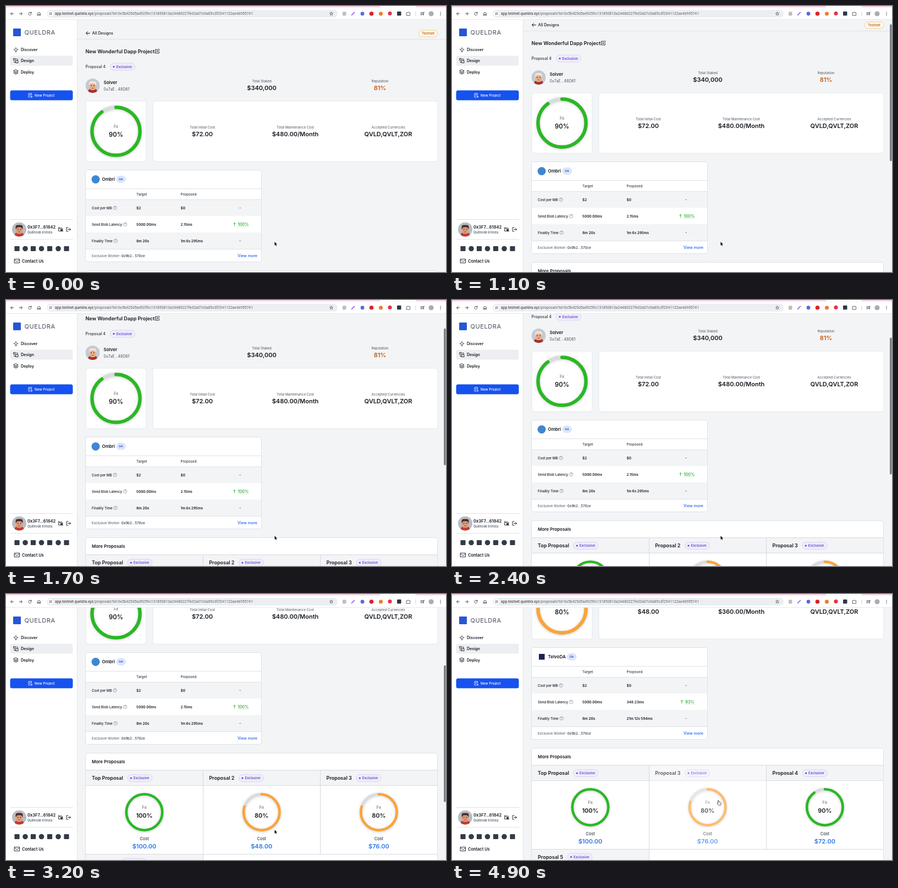
Recreate the animation shown at these times as an HTML page with a canvas. Size 800 by 484 pixels, loop 5 s.

```html
<!DOCTYPE html>
<html lang="en">
<head>
<meta charset="utf-8">
<title>Proposal page</title>
<style>
html, body { margin: 0; width: 100%; height: 100%; overflow: hidden; background: #fff; }
canvas { display: block; width: 800px; height: 484px; }
</style>
</head>
<body>
<canvas id="stage"></canvas>
<script>
const W = 800, H = 484, LOOP = 5000, STEP = 100;
const SWITCH = 4500, HOVER = 3500;
const INK = '#16191f', GRAY = '#4b5563', LINE = '#dde1e7', PAGE = '#f3f4f6';
const BLUE = '#1652f0', GREEN = '#2ab824', ORANGE = '#faa43a';

const canvas = document.getElementById('stage');
const dpr = window.devicePixelRatio || 1;
canvas.width = W * dpr;
canvas.height = H * dpr;
const c = canvas.getContext('2d');

// Drawing helpers
function text(s, x, y, size, weight = 500, color = INK, align = 'left', family = 'Inter') {
  c.font = `${weight} ${size}px ${family}, sans-serif`;
  c.fillStyle = color;
  c.textAlign = align;
  c.fillText(s, x, y + size * 0.36);
  return c.measureText(s).width;
}

function rect(x, y, w, h, color) {
  c.fillStyle = color;
  c.fillRect(x, y, w, h);
}

function box(x, y, w, h, r, fill, stroke) {
  c.beginPath();
  c.roundRect(x, y, w, h, r);
  if (fill) { c.fillStyle = fill; c.fill(); }
  if (stroke) { c.strokeStyle = stroke; c.lineWidth = 1; c.stroke(); }
}

function disc(x, y, r, color) {
  c.beginPath();
  c.arc(x, y, r, 0, 7);
  c.fillStyle = color;
  c.fill();
}

function path(d, x, y, color, width = 1, fill) {
  c.save();
  c.translate(x, y);
  c.lineWidth = width;
  c.lineCap = c.lineJoin = 'round';
  const p = new Path2D(d);
  if (fill) { c.fillStyle = fill; c.fill(p); }
  if (color) { c.strokeStyle = color; c.stroke(p); }
  c.restore();
}

// Timing helpers
const clamp = v => Math.max(0, Math.min(1, v));
const smooth = v => v * v * (3 - 2 * v);
const mix = (a, b, k) => a + (b - a) * k;

function track(keys, t) {
  if (t <= keys[0][0]) return keys[0][1];
  for (let i = 1; i < keys.length; i++) {
    const [t0, a] = keys[i - 1], [t1, b] = keys[i];
    if (t < t1) return mix(a, b, (t - t0) / (t1 - t0));
  }
  return keys[keys.length - 1][1];
}

const SCROLL = [[900, 0], [1400, 38], [2200, 66], [2400, 80], [2800, 155], [3100, 188], [3400, 201]];
const CURSOR_X = [[3400, 489], [3900, 488], [4400, 486]];
const CURSOR_Y = [[3400, 433], [3900, 399], [4400, 380]];

function ring(x, y, r, width, value, color) {
  c.save();
  c.lineWidth = width;
  c.lineCap = 'round';
  c.shadowColor = 'rgba(0,0,0,.2)';
  c.shadowBlur = 5 * dpr;
  c.shadowOffsetY = dpr;
  c.strokeStyle = '#d9dbdf';
  c.beginPath();
  c.arc(x, y, r, 0, Math.PI * 2);
  c.stroke();
  c.shadowColor = 'transparent';
  c.strokeStyle = color;
  c.beginPath();
  c.arc(x, y, r, -Math.PI / 2, Math.PI * (2 * value - 0.5));
  c.stroke();
  c.restore();
}

function chip(x, y) {
  box(x, y - 6.5, 45, 13, 6.5, '#efedfb', '#d9d6f3');
  disc(x + 6.5, y, 1.6, '#5a3fd6');
  text('Exclusive', x + 11, y, 6.3, 500, '#5636c9');
}

function help(x, y) {
  c.beginPath();
  c.arc(x, y, 3.2, 0, 7);
  c.strokeStyle = '#6b7280';
  c.lineWidth = 0.6;
  c.stroke();
  text('?', x, y, 4.6, 500, '#6b7280', 'center');
}

function stat(label, value, x, y, color = INK) {
  text(label, x, y, 6.1, 400, GRAY, 'center');
  text(value, x, y + 12.5, 11, 600, color, 'center');
}

function avatar(x, y, back, hair, skin, shirt) {
  c.save();
  c.beginPath();
  c.arc(x, y, 13, 0, 7);
  c.clip();
  rect(x - 13, y - 13, 26, 26, back);
  box(x - 8, y + 6, 16, 10, 4, shirt);
  box(x - 6.5, y - 8, 13, 9, 4, hair);
  box(x - 5.5, y - 4, 11, 12, 4, skin);
  disc(x - 2.4, y, 0.9, '#40353a');
  disc(x + 2.4, y, 0.9, '#40353a');
  rect(x - 2, y + 4, 4, 1, '#b0453a');
  c.restore();
}

// Browser bar
function toolbar() {
  rect(0, 0, W, 25, '#fff');
  rect(0, 0, W, 2.5, '#f6d3e3');
  rect(680, 0, 65, 2.5, '#fff');
  rect(0, 24, W, 1, '#e6e8ec');
  const ink = '#4a4d52';
  path('M2.5 0H-2.5M0-2.5L-2.5 0L0 2.5', 11, 14, ink);
  path('M-2.5 0H2.5M0-2.5L2.5 0L0 2.5', 27, 14, ink);
  path('M2.4-1.2A2.7 2.7 0 1 0 2.6 1M2.6-3V-1H.6', 43.5, 14, ink);
  path('M-2.5-.5L0-3L2.5-.5V3H.8V.8H-.8V3H-2.5Z', 60, 14, ink);
  box(74, 7, 529, 14, 7, '#eceef2');
  disc(81, 14, 5, '#fff');
  path('M-2.4-1.3H.5M2.4 1.3H-.5', 81, 14, ink, 0.8);
  disc(82.5, 12.7, 0.9, ink);
  disc(79.5, 15.3, 0.9, ink);
  const host = 'app.testnet.queldra.xyz';
  const w = text(host, 89, 13.7, 6.75, 400, '#2b2d31', 'left', 'Roboto');
  text('/proposals?id=0x5b425d5ad9259c131850813a24480227fe02a07c0a85c3f2541122ae4b955741',
    89 + w, 13.7, 6.75, 400, '#5f6368', 'left', 'Roboto');
  path('M0-3L.9-1L3-.8L1.4.6L1.9 2.7L0 1.6L-1.9 2.7L-1.4.6L-3-.8L-.9-1Z', 591.5, 14, ink, 0.8);

  box(612, 10.5, 6.5, 7, 1, '#b9bec4');
  path('M-2.5 2.5L2.5-2.5', 631, 14, '#8a4de0', 1.5);
  disc(648, 14, 3.4, '#5468e8');
  disc(664.5, 14, 3.8, '#d8232f');
  disc(681.5, 14, 3.6, '#e77f35');
  disc(698, 13.5, 3.6, '#e23645');
  box(711, 10, 7.5, 7.5, 1, '#2c3848');
  path('M-3-2H-1A1 1 0 0 1 1-2H3V0A1 1 0 0 1 3 1.4V3.2H-3Z', 731.5, 14, ink, 0.9);
  rect(744.5, 10, 0.8, 8, '#dcb9cb');
  path('M-3-2H1.5M-3 0H0M-3 2H-1M2.2 1.5V-2.5H3.6', 757, 14, ink, 1);
  disc(758.5, 15.7, 1.1, ink);
  disc(773, 14, 4.6, '#a9adb3');
  for (const y of [11.5, 14, 16.5]) disc(790, y, 0.8, ink);
}

function sidebar() {
  rect(0, 25, 129, H, '#fff');
  rect(129, 25, 1, H, '#dfe2e7');
  box(13, 41, 14, 14, 1, '#2456d6');
  c.letterSpacing = '0.6px';
  text('QUELDRA', 33.5, 48.5, 11, 400, '#454c58');
  c.letterSpacing = '0px';

  box(7.5, 90.5, 114, 18, 3, '#eceef1');
  path('M-1.2 2A2.3 2.3 0 1 1 1.2 2ZM-1 3.7H1M-4-.5H-3.6M3.6-.5H4M0-4.4V-4', 18, 79.5, INK, 0.9);
  path('M-4-4H-1V-1H-4ZM0 0H4V4H0ZM1-3H3V-1M-3 1V3H-1', 18, 99.5, INK, 0.9);
  path('M0-4L4-2L0 0L-4-2ZM-4 0L0 2L4 0M-4 2L0 4L4 2', 18, 120, INK, 0.9);
  text('Discover', 27, 79.5, 7.1, 600);
  text('Design', 27, 99.7, 7.1, 600);
  text('Deploy', 27, 120, 7.1, 600);

  box(7.5, 153.4, 114, 18.2, 3.5, BLUE);
  path('M2.5-.5V-3.5H-3V3.5H0M-1.2-1.5H1M-1.2.4H.4M2.5 1V4M1 2.5H4', 44, 162.5, '#fff', 0.8);
  text('New Project', 52, 162.7, 6.3, 500, '#fff');

  rect(8, 388, 114, 1, LINE);
  avatar(24, 406.5, '#b9bcc2', '#4a2e2a', '#e39a77', '#c23a34');
  text('0x3F7...61842', 39, 402.5, 7.5, 600);
  text('Quillnode kVesta', 39, 411.8, 5.6, 500, GRAY);
  path('M-3.5-2.5H2.5V3H-3.5ZM.5 0H3.5V2H.5ZM-4-4L4 4', 99.5, 406.5, INK, 0.9);
  path('M-.5-3.5H-3.5V3.5H-.5M-1 0H4M2-2L4 0L2 2', 113.5, 406.5, INK, 0.9);
  rect(8, 424, 114, 1, LINE);
  [20, 35, 49.5, 64.5, 79.5, 95, 110].forEach((x, i) => {
    if (i % 2) disc(x, 441.5, 4.8, '#333b48');
    else box(x - 4.6, 437, 9.2, 9, 1, '#333b48');
  });
  path('M-4.5-3.5H4.5V3.5H-4.5ZM-4.5-2L0 1L4.5-2', 20, 464, INK, 0.9);
  text('Contact Us', 29, 464, 7.4, 600);
}

function summary(s) {
  path('M3.5 0H-3.5M-.5-3L-3.5 0L-.5 3', 149, 49.5, INK, 1);
  text('All Designs', 156.5, 49.7, 7.2, 500);
  box(750.5, 44, 34.5, 12, 6, '#fef8ea', '#f0cf98');
  text('Testnet', 767.5, 50, 6.4, 500, '#b45a0c', 'center');
  rect(130, 60, 670, 1, LINE);

  text('New Wonderful Dapp Project', 144.5, 82.3, 9, 600);
  path('M0-3.2H-3.5V3.6H3.3V.5M-1 1L-.7-.8L2.8-4.2L4.2-2.8L.7.7Z', 275, 82.3, INK, 0.9);
  text('Proposal ' + s.id, 144.5, 110.7, 7.1, 500, '#2d333d');
  chip(189.5, 110.5);

  avatar(157.5, 145, '#c6c9d1', '#ece4dc', '#e8b08a', '#a5332f');
  text('Solver', 177.5, 139.2, 8, 600);
  text('0x7aE...48D61', 177.5, 151, 7, 400, GRAY);
  stat('Total Staked', '$340,000', 465, 137);
  stat('Reputation', '81%', 680, 137, '#c2590f');

  box(145, 173, 110, 110, 4, '#fff', '#e4e7eb');
  box(267, 173, 518, 110, 4, '#fff', '#e4e7eb');
  ring(200, 228, 43.6, 6.2, s.ring, s.color);
  text('Fit', 200, 219.5, 7, 400, GRAY, 'center');
  text(s.fit, 200, 233.5, 11.2, 600, INK, 'center');
  stat('Total Initial Cost', s.cost, 357, 220.5);
  stat('Total Maintenance Cost', s.upkeep, 526, 220.5);
  stat('Accepted Currencies', 'QVLD,QVLT,ZOR', 695, 220.5);
}

function metrics(s) {
  box(144.5, 298.5, 320, 167, 4, '#fff', LINE);
  if (s.round) disc(163, 315.5, 7.5, '#3f86d2');
  else box(158, 310, 10.5, 10.5, 0, '#1d2350');
  const end = 174.5 + text(s.name, 174.5, 315.3, 8, 600);
  box(end + 3, 309.5, 16, 11.5, 5.7, '#dfe8fb', '#c9d8f7');
  text('DA', end + 11, 315.3, 5.4, 600, '#2457d8', 'center');

  rect(145, 352, 319, 30, PAGE);
  rect(145, 412, 319, 30, PAGE);
  for (const y of [332, 352, 442]) rect(145, y, 319, 1, LINE);
  text('Target', 237, 342.3, 6.3, 500, '#333a45');
  text('Proposed', 317.5, 342.3, 6.3, 500, '#333a45');

  const rows = [
    ['Cost per MB', '$2', '$0'],
    ['Send Blob Latency', '5000.00ms', s.latency],
    ['Finality Time', '8m 20s', s.finality]
  ];
  rows.forEach(([label, target, proposed], i) => {
    const y = 367.3 + 30 * i;
    help(159.5 + text(label, 156, y, 6.2, 500) + 2, y);
    text(target, 237, y, 6.4, 600);
    text(proposed, 317.5, y, 6.4, 600);
    if (i !== 1) text('-', 425.5, y, 7, 500, INK, 'center');
  });

  const x = s.round ? 421.5 : 424;
  path('M0 2.8V-2.6M-2-.7L0-2.7L2-.7', x - 6, 397, GREEN, 0.9);
  const w = text(s.gain, x, 397, 7.4, 500, '#23a52b');
  for (let i = 0; i < w; i += 2) rect(x + i, 401, 1, 0.8, '#8fd394');

  const wk = text('Exclusive Worker: ', 156, 454.3, 6.2, 400, GRAY);
  text('0x9b2...570ce', 156 + wk, 454.3, 6.2, 500, '#333a45');
  text('View more', 457, 454, 7.1, 500, '#1c60ea', 'right');
}

function heading(label, x, y) {
  chip(x + text(label, x, y, 9, 600) + 8, y);
}

function proposals(cards, hover) {
  box(144.5, 481.5, 640, 260, 4, '#fff', LINE);
  text('More Proposals', 156, 497, 8, 600);
  rect(145, 512, 639, 29, PAGE);
  rect(145, 666, 213, 29, PAGE);
  for (const y of [512, 540, 665]) rect(145, y, 639, 1, '#d5d9df');
  rect(358, 512, 1, 200, '#d5d9df');
  rect(571, 512, 1, 153, '#d5d9df');
  cards.forEach((p, i) => {
    const x = 251.5 + 213.2 * i;
    heading(p.title, 156 + 213.3 * i, 527);
    ring(x, 589, 32.7, 4.6, p.ring, p.color);
    text('Fit', x, 580.5, 7, 400, GRAY, 'center');
    text(p.fit, x, 595.5, 11, 600, INK, 'center');
    text('Cost', x, 637.5, 7.4, 500, '#333a45', 'center');
    text(p.cost, x, 651.5, 11, 600, '#2a78e8', 'center');
  });
  rect(359, 513, 212, 152, `rgba(255,255,255,${0.28 * hover})`);
  heading('Proposal 5', 156, 679.5);
}

function cursor(x, y, hand) {
  if (hand) {
    path('M-2.4 0V-4.2Q-1.6-5-.9-4.2V-1.6L2.6-.8Q3.6-.4 3.4.8L2.7 4.2H-1.6L-4 .8Q-3.6-.3-2.4 .6Z',
      x, y, '#2b2b2b', 0.8, '#fff');
  } else {
    const arrow = 'M-.6-3.8V3L.9 1.7L2 4L3 3.5L2 1.2H4Z';
    path(arrow, x, y - 0.2, '#fff', 0.8);
    path(arrow, x, y - 0.2, null, 1, '#111');
  }
}

function draw(t) {
  const after = t >= SWITCH;
  const k = smooth(clamp((t - SWITCH) / 400));
  const scroll = Math.round(track(SCROLL, t));
  const current = after
    ? { id: 2, ring: mix(0.9, 0.8, k), color: ORANGE, fit: '80%', cost: '$48.00', upkeep: '$360.00/Month',
        name: 'TelvoDA', round: false, latency: '348.23ms', finality: '21m 12s 594ms', gain: '93%' }
    : { id: 4, ring: 0.9, color: GREEN, fit: '90%', cost: '$72.00', upkeep: '$480.00/Month',
        name: 'Ombri', round: true, latency: '2.15ms', finality: '1m 6s 295ms', gain: '100%' };
  const cards = [
    { title: 'Top Proposal', ring: 1, color: GREEN, fit: '100%', cost: '$100.00' },
    { title: after ? 'Proposal 3' : 'Proposal 2', ring: 0.8, color: ORANGE, fit: '80%',
      cost: after ? '$76.00' : '$48.00' },
    after
      ? { title: 'Proposal 4', ring: mix(0.8, 0.9, k), color: GREEN, fit: '90%', cost: '$72.00' }
      : { title: 'Proposal 3', ring: 0.8, color: ORANGE, fit: '80%', cost: '$76.00' }
  ];

  c.setTransform(dpr, 0, 0, dpr, 0, 0);
  rect(0, 0, W, H, PAGE);
  c.save();
  c.translate(0, -scroll);
  summary(current);
  metrics(current);
  proposals(cards, clamp((t - HOVER) / 200));
  c.restore();

  sidebar();
  toolbar();
  if (t >= 1000) {
    c.globalAlpha = 1 - clamp((t - 4000) / 400);
    box(796, 25 + scroll * 0.545, 3.7, 249, 1.8, '#7d8086');
    c.globalAlpha = 1;
  }
  cursor(track(CURSOR_X, t), track(CURSOR_Y, t), t >= HOVER);
}

const start = performance.now();
function tick() {
  const t = (performance.now() - start) % LOOP;
  draw(Math.floor(t / STEP) * STEP);
  requestAnimationFrame(tick);
}
tick();
</script>
</body>
</html>
```
